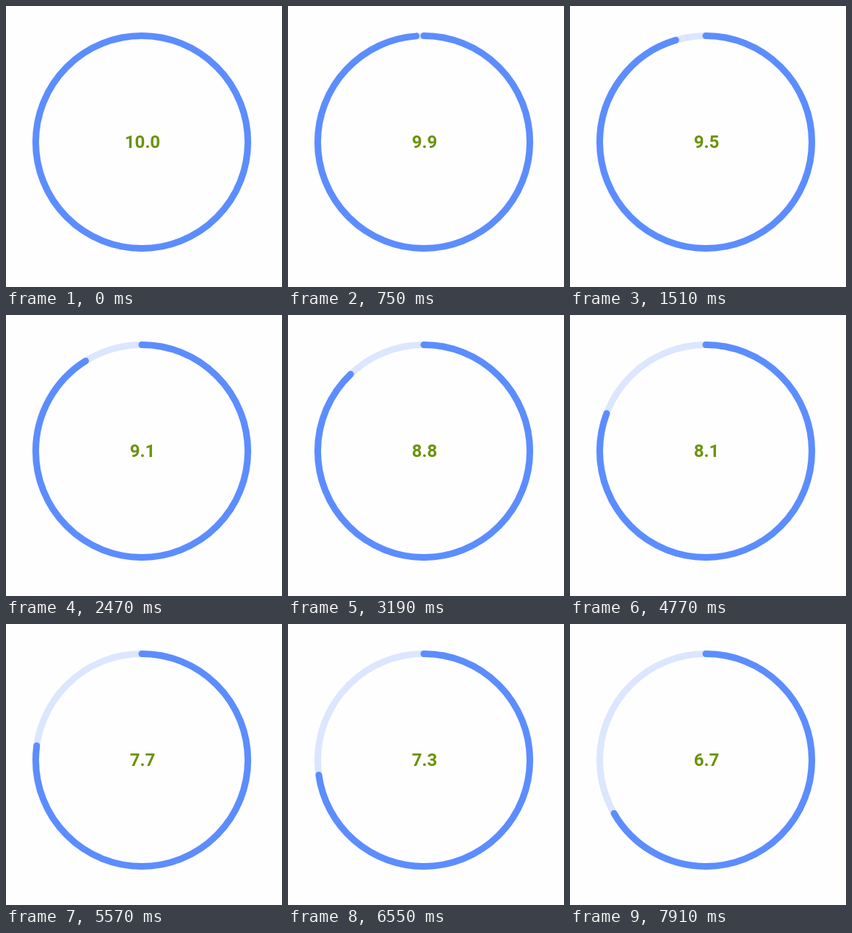
An HTML page for the animation above (8000 ms loop, 376x382 px).

```html
<!DOCTYPE html>
<html lang="en">
<head>
<meta charset="utf-8">
<title>Countdown ring</title>
<style>
  html, body { margin: 0; width: 100%; height: 100%; overflow: hidden; background: #fefefe; }
  svg { display: block; width: 100vw; height: 100vh; }
  circle { fill: none; stroke-width: 9; }
  text { font: 700 24px Roboto, Arial, sans-serif; fill: #6a9308; text-anchor: middle; }
</style>
</head>
<body>
<svg viewBox="0 0 376 382">
  <circle cx="185" cy="185" r="144.5" stroke="#dce6ff"/>
  <circle id="arc" cx="185" cy="185" r="144.5" stroke="#5c8dff" stroke-linecap="round" transform="rotate(-90 185 185)"/>
  <text id="label" x="186" y="193">10.0</text>
</svg>
<script>
  const LOOP = 8000, START = 490, END = 7910;
  const TOTAL = 10, RATE = 0.45; // units, units per second
  const LENGTH = 2 * Math.PI * 144.5;
  const arc = document.getElementById('arc');
  const label = document.getElementById('label');

  function draw(ms) {
    const elapsed = Math.max(0, Math.min(ms, END) - START) / 1000;
    const left = TOTAL - RATE * elapsed;
    const dash = LENGTH * left / TOTAL;
    arc.setAttribute('stroke-dasharray', left < TOTAL ? `${dash} ${LENGTH}` : 'none');
    label.textContent = left.toFixed(1);
  }

  const origin = performance.now();
  function tick() {
    draw((performance.now() - origin) % LOOP);
    requestAnimationFrame(tick);
  }
  tick();
</script>
</body>
</html>
```
